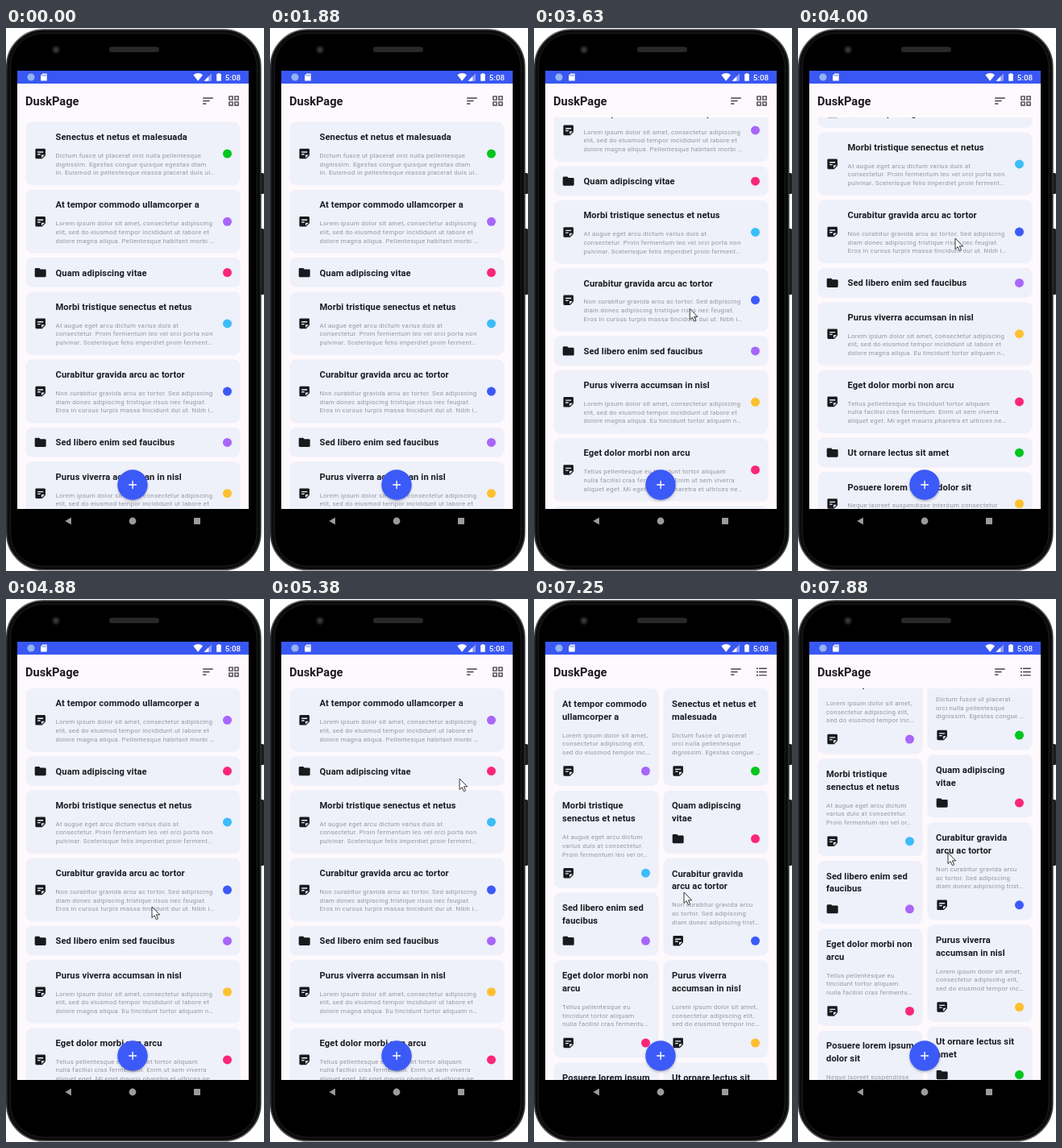
Animation of 320x674 px, one loop 8000 ms. Source, as an HTML page:

```html
<!DOCTYPE html>
<html lang="en">
<head>
<meta charset="utf-8">
<title>Notes app</title>
<style>
html, body { margin: 0; width: 100%; height: 100%; overflow: hidden; background: #fff; }
svg { display: block; width: 320px; height: 674px; }
text { font-family: Roboto, "Noto Sans", sans-serif; white-space: pre; }
.title { font-size: 11.17px; font-weight: 700; letter-spacing: .1px; fill: #1b1c22; }
.body { font-size: 7.95px; letter-spacing: .28px; fill: #96989f; }
.app { font-size: 14.6px; font-weight: 700; fill: #1b1b1f; }
.clock { font-size: 9.8px; font-weight: 500; fill: #fff; }
</style>
</head>
<body>
<svg viewBox="0 0 320 674" xmlns="http://www.w3.org/2000/svg">
  <defs>
    <clipPath id="view"><rect x="14" y="111" width="287" height="486"/></clipPath>
    <clipPath id="pressed"><rect x="24.2" y="411.6" width="266.4" height="78.6" rx="3"/></clipPath>
    <filter id="soft" x="-30%" y="-30%" width="160%" height="160%"><feGaussianBlur stdDeviation="1.8"/></filter>
    <linearGradient id="rim" x1="0" y1="0" x2="0" y2="1">
      <stop offset="0" stop-color="#6a6a6a"/><stop offset=".08" stop-color="#2c2c2c"/>
      <stop offset=".92" stop-color="#2c2c2c"/><stop offset="1" stop-color="#5c5c5c"/>
    </linearGradient>
  </defs>

  <!-- phone -->
  <rect x="314" y="180" width="6" height="26" rx="1.5" fill="#1c1c1c"/>
  <rect x="314" y="249" width="6" height="82" rx="1.5" fill="#1c1c1c"/>
  <rect x=".8" y="1.8" width="315" height="671" rx="46" fill="#0c0c0c" stroke="url(#rim)" stroke-width="1.6"/>
  <rect x="5.5" y="6.5" width="305.5" height="661.5" rx="41" fill="#000" stroke="#1d1d1d"/>
  <circle cx="62" cy="27" r="5" fill="#1d1d1f"/>
  <circle cx="62" cy="27" r="2.2" fill="#3a3b40"/>
  <rect x="128" y="23.3" width="62" height="6.8" rx="3.4" fill="#29292a"/>

  <!-- screen -->
  <rect x="14" y="53" width="287" height="544" fill="#fef9fd"/>
  <rect x="14" y="53" width="287" height="16" fill="#3957f3"/>
  <circle cx="31" cy="61" r="4.6" fill="#94b3ee"/>
  <path d="M45.5 56.4h5.2v9.2h-7.6v-6.7z" fill="#fff"/>
  <path d="M45.6 58v2M47.3 57.6v2.4M49 57.6v2.4" stroke="#3957f3" stroke-width=".7"/>
  <path d="M232.3 58.2q5.9-4.3 11.8 0l-5.9 7.6z" fill="#fff"/>
  <path d="M255 56.3v9.4h-9.4z" fill="#fff" opacity=".4"/>
  <path d="M251.3 60v5.7h-5.7z" fill="#fff"/>
  <path d="M262.8 56h2.4v1h1.6v8.8h-5.6V57h1.6z" fill="#fff"/>
  <text class="clock" x="271.8" y="64.5">5:08</text>

  <text class="app" x="24" y="96">DuskPage</text>
  <path transform="translate(242.1 82.1) scale(.698)" fill="#44454c" d="M3 18h6v-2H3zM3 6v2h18V6zM3 13h12v-2H3z"/>
  <path id="toGrid" transform="translate(274.1 82.1) scale(.698)" fill="#44454c" fill-rule="evenodd"
    d="M3 3h8v8H3zM5 5v4h4V5zM3 13h8v8H3zM5 15v4h4v-4zM13 3h8v8h-8zM15 5v4h4V5zM13 13h8v8h-8zM15 15v4h4v-4z"/>
  <g id="toList" transform="translate(274.1 82.1) scale(.698)" fill="#44454c">
    <circle cx="4" cy="6" r="1.5"/><circle cx="4" cy="12" r="1.5"/><circle cx="4" cy="18" r="1.5"/>
    <path d="M7 5h14v2H7zM7 11h14v2H7zM7 17h14v2H7z"/>
  </g>

  <g clip-path="url(#view)">
    <g id="list">
      <g id="cards"></g>
      <g id="ripple" clip-path="url(#pressed)">
        <rect x="24" y="411" width="267" height="80" opacity=".09"/>
        <circle id="wave" cx="180" cy="472" opacity=".06"/>
      </g>
    </g>
    <g id="left"></g>
    <g id="right"></g>
  </g>

  <circle cx="157" cy="568.6" r="18.6" fill="#30344a" opacity=".35" filter="url(#soft)"/>
  <circle cx="157" cy="567" r="18.7" fill="#3c5af8"/>
  <path d="M152.2 567h9.8M157.1 562.1v9.8" stroke="#fff" stroke-width="1.4"/>

  <!-- navigation bar -->
  <g fill="#9b9b9b">
    <path d="M73.3 612l7.6-4.4v8.8z"/>
    <circle cx="157" cy="612" r="4.4"/>
    <rect x="233" y="608" width="8" height="8" rx=".6"/>
  </g>

  <path id="pointer" d="M0 0v13.6l3.1-2.9 2.3 5 2.2-1-2.2-4.8h4.3z" fill="#fff" stroke="#222" stroke-width=".9" stroke-linejoin="round"/>
</svg>

<script>
const LOOP = 8000, TOGGLE = 5900;
const $ = id => document.getElementById(id);

const GREEN = '#00c61c', PURPLE = '#a866fa', PINK = '#fb2677',
      SKY = '#3cbcf8', BLUE = '#3c5af8', AMBER = '#fdc02f';
const LOREM = 'Lorem ipsum dolor sit amet, consectetur adipiscing|elit, sed do eiusmod tempor incididunt ut labore et|dolore magna aliqua. ';
const LOREM_SHORT = 'Lorem ipsum dolor sit amet,|consectetur adipiscing elit,|sed do eiusmod tempor inc…';

// "|" marks a line break; the title only breaks in the grid
const items = [
  { title: 'Senectus et netus et|malesuada', color: GREEN,
    wide: 'Dictum fusce ut placerat orci nulla pellentesque|dignissim. Egestas congue quisque egestas diam|in. Euismod in pellentesque massa placerat duis ul…',
    slim: 'Dictum fusce ut placerat|orci nulla pellentesque|dignissim. Egestas congue …' },
  { title: 'At tempor commodo|ullamcorper a', color: PURPLE,
    wide: LOREM + 'Pellentesque habitant morbi …', slim: LOREM_SHORT },
  { title: 'Quam adipiscing|vitae', color: PINK },
  { title: 'Morbi tristique|senectus et netus', color: SKY,
    wide: 'At augue eget arcu dictum varius duis at|consectetur. Proin fermentum leo vel orci porta non|pulvinar. Scelerisque felis imperdiet proin ferment…',
    slim: 'At augue eget arcu dictum|varius duis at consectetur.|Proin fermentum leo vel or…' },
  { title: 'Curabitur gravida|arcu ac tortor', color: BLUE,
    wide: 'Non curabitur gravida arcu ac tortor. Sed adipiscing|diam donec adipiscing tristique risus nec feugiat.|Eros in cursus turpis massa tincidunt dui ut. Nibh i…',
    slim: 'Non curabitur gravida arcu|ac tortor. Sed adipiscing|diam donec adipiscing trist…' },
  { title: 'Sed libero enim sed|faucibus', color: PURPLE },
  { title: 'Purus viverra|accumsan in nisl', color: AMBER,
    wide: LOREM + 'Eu tincidunt tortor aliquam n…', slim: LOREM_SHORT },
  { title: 'Eget dolor morbi non|arcu', color: PINK,
    wide: 'Tellus pellentesque eu tincidunt tortor aliquam|nulla facilisi cras fermentum. Enim ut sem viverra|aliquet eget. Mi eget mauris pharetra et ultrices ne…',
    slim: 'Tellus pellentesque eu|tincidunt tortor aliquam|nulla facilisi cras fermentu…' },
  { title: 'Ut ornare lectus sit|amet', color: GREEN },
  { title: 'Posuere lorem ipsum|dolor sit', color: AMBER,
    wide: 'Neque laoreet suspendisse interdum consectetur|libero id faucibus nisl. Amet nisl purus in mollis|nunc sed id semper. Vitae congue eu consequat…',
    slim: 'Neque laoreet suspendisse|interdum consectetur|libero id faucibus nisl. A…' },
];

const NOTE = 'M19 3H5c-1.1 0-2 .9-2 2v14c0 1.1.9 2 2 2h10l6-6V5c0-1.1-.9-2-2-2zM7 8h10v2H7V8zm5 6H7v-2h5v2zm2 5.5V14h5.5L14 19.5z';
const FOLDER = 'M10 4H4c-1.1 0-2 .9-2 2v12c0 1.1.9 2 2 2h16c1.1 0 2-.9 2-2V8c0-1.1-.9-2-2-2h-8l-2-2z';

const lines = (text, cls, x, y, step) => text.split('|')
  .map((s, i) => `<text class="${cls}" x="${x}" y="${y + i * step}">${s}</text>`).join('');

function card(x, y, w, h, iconY, item) {
  const icon = item.wide ? NOTE : FOLDER;
  return `<rect x="${x}" y="${y}" width="${w}" height="${h}" rx="8.2" fill="#eef0fa"/>
    <path d="${icon}" fill="#191a1e" transform="translate(${x + 9.8} ${iconY - 8.4}) scale(.698)"/>
    <circle cx="${x + w - 16}" cy="${iconY}" r="5.5" fill="${item.color}"/>`;
}

function listCards() {
  let y = 116.6;
  return items.map(item => {
    const h = item.wide ? 78.6 : 36.8, x = 61.5;
    const out = card(24.5, y, 266, h, y + h / 2 + .2, item)
      + lines(item.title.replace('|', ' '), 'title', x, y + 22.5, 0)
      + lines(item.wide || '', 'body', x, y + 44.3, 10.7);
    y += h + 5.6;
    return out;
  }).join('');
}

function gridColumn(x, order) {
  let y = 111;
  return order.map(i => {
    const item = items[i], h = item.wide ? 121 : 78.4;
    const out = card(x, y, 130, h, y + h - 18.5, item)
      + lines(item.title, 'title', x + 10.5, y + 22.7, 15.8)
      + lines(item.slim || '', 'body', x + 10.5, y + 60.5, 10.7);
    y += h + 5.7;
    return out;
  }).join('');
}

$('cards').innerHTML = listCards();
$('left').innerHTML = gridColumn(24.5, [1, 3, 5, 7, 9]);
$('right').innerHTML = gridColumn(160.5, [0, 2, 4, 6, 8]);

const smooth = p => p * p * (3 - 2 * p);

// keys: [time, value] pairs, eased from one to the next
function track(keys, t) {
  if (t <= keys[0][0]) return keys[0][1];
  for (let i = 1; i < keys.length; i++) {
    const [t0, a] = keys[i - 1], [t1, b] = keys[i];
    if (t < t1) return a + (b - a) * smooth((t - t0) / (t1 - t0));
  }
  return keys[keys.length - 1][1];
}

const scroll = [[3120, 0], [3250, 8], [3960, 198], [4130, 198], [4860, 90]];
const leftShift = [[7300, 0], [7870, -39.5]];
const rightShift = [[7300, 0], [7870, -44.5]];
const pointerX = [[2960, 212], [3090, 191], [3250, 191], [3960, 195], [4130, 195], [4860, 181],
  [5020, 181], [5700, 280], [6420, 280], [7180, 186]];
const pointerY = [[2960, 560], [3090, 466], [3250, 457.5], [3960, 261], [4080, 261], [4860, 382],
  [5020, 382], [5700, 91], [6420, 91], [7180, 364], [7270, 364], [7870, 315]];
const rippleFade = [[3080, 0], [3190, 1], [3290, 1], [3520, 0]];
const waveSize = [[3080, 8], [3250, 33], [3500, 60]];

const move = (id, x, y) => $(id).setAttribute('transform', `translate(${x} ${y})`);
const show = (id, on) => $(id).setAttribute('visibility', on ? 'visible' : 'hidden');

function draw(t) {
  const grid = t >= TOGGLE;
  show('list', !grid);
  show('toGrid', !grid);
  for (const id of ['left', 'right', 'toList']) show(id, grid);
  move('list', 0, -track(scroll, t));
  move('left', 0, track(leftShift, t));
  move('right', 0, track(rightShift, t));
  $('ripple').setAttribute('opacity', track(rippleFade, t));
  $('wave').setAttribute('r', track(waveSize, t));
  show('pointer', t >= 2960);
  move('pointer', track(pointerX, t), track(pointerY, t));
}

const start = performance.now();
function tick() {
  draw((performance.now() - start) % LOOP);
  requestAnimationFrame(tick);
}
tick();
</script>
</body>
</html>
```
